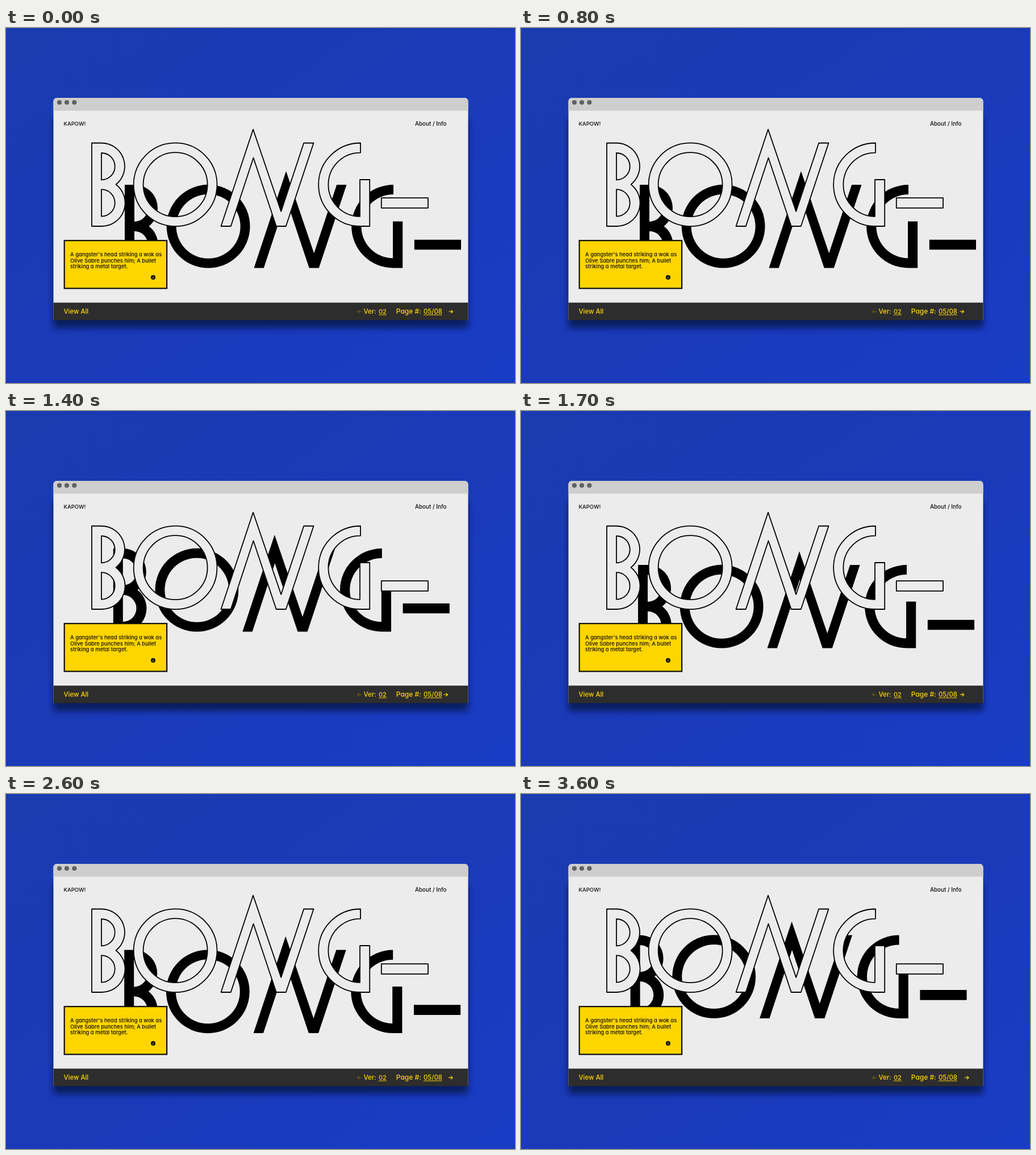
An HTML page that plays this animation: 896x625 px, repeating every 3700 ms.

```html
<!DOCTYPE html>
<html lang="en">
<head>
<meta charset="utf-8">
<title>Bong</title>
<style>
  html, body { margin: 0; width: 100%; height: 100%; overflow: hidden; background: #1a3bb8; }
  svg { display: block; width: 896px; height: 625px; }
  text {
    font-family: Inter, Lato, sans-serif;
    font-weight: 500;
    font-feature-settings: "cv11";
    white-space: pre;
  }
  .small { font-size: 9.5px; fill: #0a0a0a; }
  .note { font-size: 9.4px; }
  .bar { font-size: 11.4px; fill: #ffd60a; }
  .line { fill: none; stroke: #ffd60a; stroke-width: 1.2; }
  .outline { fill: #ececec; stroke: #000; stroke-width: 1.8; stroke-linejoin: round; }
</style>
</head>
<body>
<svg viewBox="0 0 896 625">
  <defs>
    <linearGradient id="sky" x1="0" y1="0" x2="1" y2="1">
      <stop offset="0" stop-color="#1b3bb0"/>
      <stop offset=".5" stop-color="#1a3ab8"/>
      <stop offset="1" stop-color="#193cc5"/>
    </linearGradient>
    <filter id="soft" x="-10%" y="-10%" width="120%" height="120%">
      <feGaussianBlur stdDeviation="5.5"/>
    </filter>
    <path id="arrow" d="M0 0H7M3.8 -3L7 0L3.8 3"/>
    <g id="word" fill-rule="evenodd">
      <path d="M151 202.5H168A41 41 0 0 1 193.6 275.5A41 41 0 0 1 168 349H151Z
               M168 220A23.7 23.7 0 0 1 168 267.4Z M168 284.2A23.7 23.7 0 0 1 168 331.6Z"/>
      <path d="M224.7 275.7a73.4 73.4 0 1 1 146.8 0a73.4 73.4 0 1 1 -146.8 0Z
               M241.6 275.7a56.5 56.5 0 1 1 113 0a56.5 56.5 0 1 1 -113 0Z"/>
      <path d="M378.5 349H395.8L435.5 228.5L475.7 349H492.8L541.5 202.5H524.2L484.2 323L435 178.5Z"/>
      <path d="M624 202.5A73.9 73.25 0 0 0 624 349H640.2V267H623V331.8A56 56 0 0 1 624 219.6Z"/>
      <path d="M660.8 299.2H743V316.8H660.8Z"/>
    </g>
  </defs>

  <rect width="896" height="625" fill="url(#sky)"/>
  <rect x="83.5" y="160" width="730" height="368" rx="4" fill="#05082c" opacity=".64" filter="url(#soft)"/>

  <path d="M83.5 514V129a6 6 0 0 1 6 -6H807.5a6 6 0 0 1 6 6V514Z" fill="#ececec"/>
  <path d="M83.5 145.5V129a6 6 0 0 1 6 -6H807.5a6 6 0 0 1 6 6V145.5Z" fill="#cecece"/>
  <g fill="#616161">
    <circle cx="94" cy="131" r="4.1"/>
    <circle cx="107" cy="131" r="4.1"/>
    <circle cx="120.3" cy="131" r="4.1"/>
  </g>

  <text class="small" x="101.5" y="172">KAPOW!</text>
  <text class="small" x="720" y="172" style="font-size:9.9px">About / Info</text>

  <use id="shade" href="#word"/>
  <use class="outline" href="#word"/>

  <rect x="102.7" y="374.2" width="180.4" height="84.2" fill="#ffd500" stroke="#0c0c0c" stroke-width="2.2"/>
  <g class="small">
    <text class="note" x="113" y="402">A gangster's head striking a wok as</text>
    <text class="note" x="113" y="412.7">Olive Sabre punches him; A bullet</text>
    <text class="note" x="113" y="423.4">striking a metal target.</text>
  </g>
  <circle cx="259" cy="439" r="4" fill="#0a0a0a"/>
  <path d="M259.3 438.4L258.6 441.2M259.6 436.5V437.2" stroke="#ffd500" stroke-width="1.1"/>

  <path d="M83.5 483.5H813.5V514.3H83.5Z" fill="#2d2d2d"/>
  <g class="bar">
    <text x="101.5" y="503.4">View All</text>
    <text x="629.5" y="503.4">Ver:</text>
    <text x="656" y="503.4" style="font-size:11px">02</text>
    <text x="686.8" y="503.4" style="font-size:12px">Page #:</text>
    <text x="735" y="503.4">05/08</text>
  </g>
  <path class="line" d="M656 505H669.8M735 505H767.5" style="stroke-width:1"/>
  <use class="line" href="#arrow" transform="translate(625.8 499.4) scale(-1 1)" style="stroke:#6b5a16"/>
  <use class="line" id="next" href="#arrow"/>
</svg>
<script>
  const LOOP = 3700, STEP = 100;
  // [step, position] pairs
  const swing = [[0, 1], [5, 0], [8, 1], [12, .02], [14, .015], [18, 1], [21, .09],
                 [22, .02], [26, .96], [29, .02], [33, .76], [36, .2]];
  const nudge = [[0, 9], [5, 6], [8, 2], [14, 0], [21, 5], [26, 8.5], [36, 10.5]];

  const shade = document.getElementById("shade");
  const next = document.getElementById("next");
  const linear = u => u;
  const sine = u => (1 - Math.cos(Math.PI * u)) / 2;

  function along(keys, step, ease) {
    const i = Math.max(1, keys.findIndex(k => k[0] >= step));
    const [a, from] = keys[i - 1], [b, to] = keys[i];
    return from + (to - from) * ease((step - a) / (b - a));
  }

  function move(el, x, y) {
    el.setAttribute("transform", `translate(${x.toFixed(2)} ${y.toFixed(2)})`);
  }

  function draw(now) {
    const step = Math.floor((now % LOOP) / STEP);
    const s = along(swing, step, sine);
    move(shade, 37.5 + 20.5 * s, 39 + 34.5 * s);
    move(next, 770.6 + along(nudge, step, linear), 499.4);
  }

  let start;
  function tick(now) {
    start ??= now;
    draw(now - start);
    requestAnimationFrame(tick);
  }
  draw(0);
  requestAnimationFrame(tick);
</script>
</body>
</html>
```
